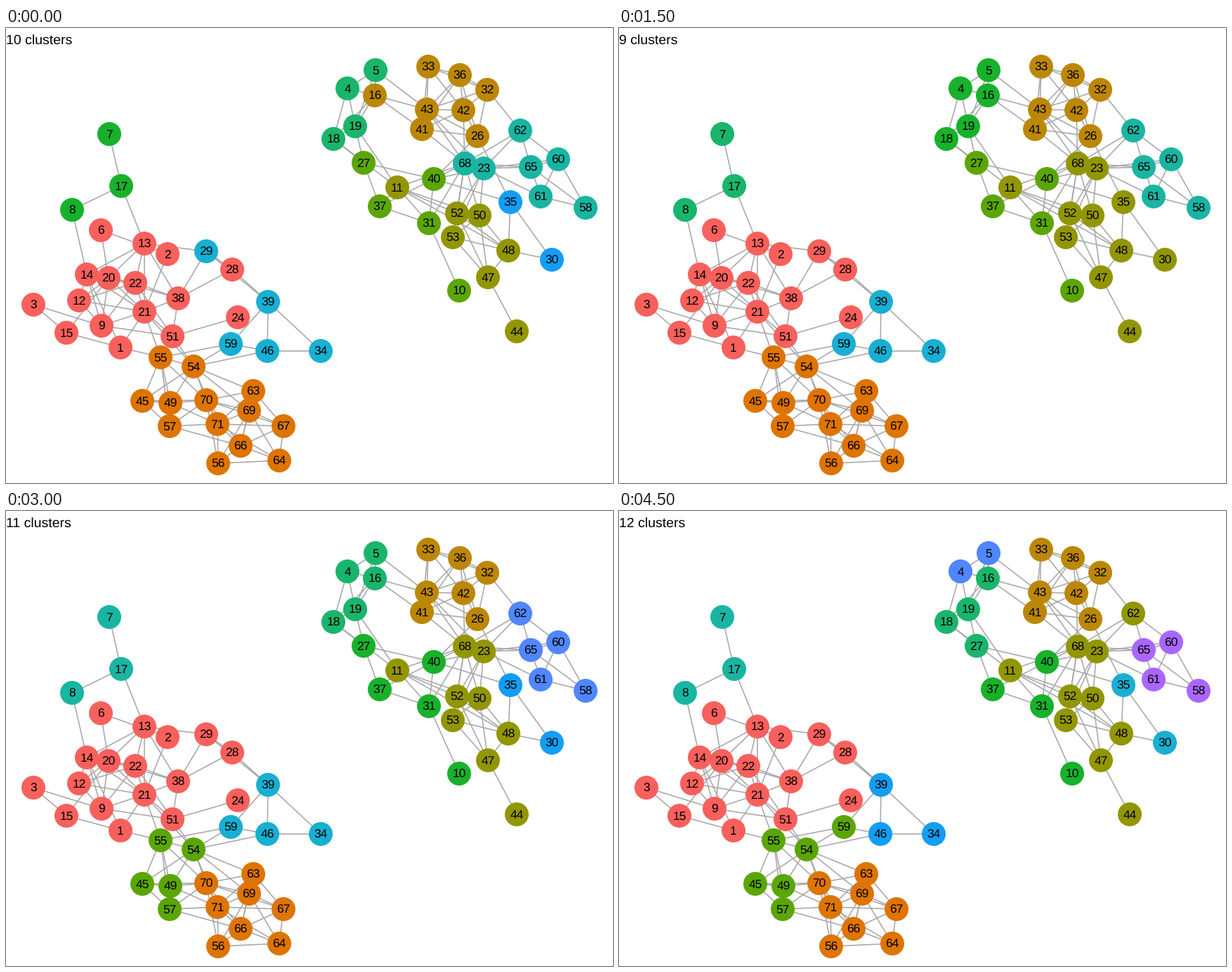
A matplotlib script for the animation above (5 s loop, 864 by 648 pixels).

```python
from itertools import combinations, pairwise, product
from math import dist

import matplotlib.pyplot as plt
from matplotlib.animation import FuncAnimation
from matplotlib.collections import LineCollection

W, H, DPI = 864, 648, 100
PT = 72 / DPI  # points per pixel
RADIUS = 17
REACH = 104    # nodes of linked parts are joined up to this distance

plt.rcParams.update({"font.family": "Liberation Sans", "text.hinting": "none"})

PALETTE = ["#F8605C", "#DE7402", "#BC8706", "#929603", "#5BA607", "#18B12B",
           "#1AB56C", "#19B5A2", "#18AFD2", "#149DF5", "#5086FF", "#A967FF"]

# Parts are sets of nodes that always share a cluster
LEFT = {
    "north": {7: (147, 151), 8: (94, 259), 17: (164, 225)},
    "crown": {2: (230, 322), 6: (135, 288)},
    "core": {9: (136, 424), 12: (104, 388), 13: (197, 307), 14: (115, 351),
             20: (146, 356), 21: (197, 404), 22: (184, 363), 38: (245, 385),
             51: (237, 439)},
    "west": {3: (39, 394), 15: (86, 434)},
    "east": {34: (448, 460), 39: (373, 390), 46: (372, 460)},
    "neck": {54: (267, 482), 55: (220, 469)},
    "nape": {45: (194, 531), 49: (234, 534)},
    "low": {56: (302, 620), 63: (352, 517), 64: (389, 616), 66: (334, 595),
            67: (395, 567), 69: (346, 545), 70: (285, 530), 71: (301, 564)},
    "1": {1: (163, 455)}, "24": {24: (330, 412)}, "28": {28: (322, 344)},
    "29": {29: (285, 318)}, "57": {57: (233, 567)}, "59": {59: (320, 450)},
}
RIGHT = {
    "pair": {4: (486, 86), 5: (526, 60)},
    "side": {18: (466, 158), 19: (497, 140)},
    "top": {26: (671, 154), 32: (685, 88), 33: (601, 55), 36: (646, 67),
            41: (592, 144), 42: (651, 117), 43: (599, 116)},
    "ring": {37: (532, 254), 40: (609, 215)},
    "mid": {11: (557, 227), 47: (686, 355), 48: (715, 317), 50: (674, 267),
            52: (642, 264), 53: (636, 298)},
    "hub": {23: (680, 200), 68: (653, 193)},
    "fan": {58: (825, 256), 60: (786, 187), 61: (761, 240), 65: (747, 198)},
    "duo": {30: (777, 330), 35: (718, 248)},
    "10": {10: (645, 374)}, "16": {16: (525, 96)}, "27": {27: (509, 192)},
    "31": {31: (602, 278)}, "44": {44: (727, 432)}, "62": {62: (732, 146)},
}
PARTS = {**LEFT, **RIGHT}
POS = {n: p for part in PARTS.values() for n, p in part.items()}
NODES = sorted(POS)

# Neighbouring parts, linked wherever their nodes are within reach
JOINS = """core-29 core-28 28-29 28-east east-59 neck-59 west-1 1-neck
    neck-nape neck-low nape-57 nape-low pair-side pair-16 side-16 side-27
    ring-27 ring-31 ring-hub hub-mid hub-fan hub-62""".split()

# Single links between parts, written as walks
WALKS = [
    (8, 14, 1, 21, 55, 51, 54, 21, 2), (17, 13), (6, 20, 15), (3, 9),
    (24, 51), (46, 54), (29, 39), (55, 57, 66), (71, 57, 70, 67),
    (5, 43, 16, 41, 68, 43, 23, 53, 68, 42), (18, 11, 19), (31, 68),
    (37, 11, 31, 10), (11, 48, 35, 40, 26, 35), (48, 30), (11, 50),
    (44, 47), (23, 60, 62, 65), (32, 62),
]

# Clusters in palette order; a step moves parts away from their home
HOME = ["core crown west 1 24 28 29", "low neck nape 57", "top", "mid hub 44"]
STEPS = [
    ["", "", "16", "", "ring 27 31 10", "north", "pair side", "fan 62 hub",
     "east 59 29", "duo"],
    ["", "", "", "", "ring 27 31 10", "north", "pair side 16", "fan 62 hub",
     "east 59", "duo"],
    ["east neck 59", "", "", "", "ring duo 31 10", "pair side 16 27", "north",
     "fan 62 hub"],
    ["", "", "", "duo", "ring 27 31 10", "pair side 16", "north", "fan 62",
     "east 59"],
    ["", "", "", "31 10", "neck nape 57", "pair side ring 16 27", "north",
     "duo", "east 59", "44", "fan 62"],
    ["", "", "pair side 16", "", "neck nape 57 1", "ring 27 31 10", "west",
     "north", "24", "duo", "east 59", "fan 62"],
    ["", "", "", "", "neck nape 57", "ring 27 31 10", "pair side 16", "north",
     "east 59", "duo", "fan 62"],
    ["", "", "16", "duo", "neck nape", "10", "north", "pair side ring 27 31",
     "east 59 28", "fan 62"],
    ["north", "1", "", "duo", "pair side ring 16 27 31 10", "west",
     "fan 62 hub", "east 59 28"],
    ["", "", "", "62", "neck nape 57 59", "ring 31 10", "side 16 27", "north",
     "duo", "east", "pair", "fan"],
]


def find_links():
    pairs = [p for part in PARTS.values() for p in combinations(part, 2)]
    for join in JOINS:
        a, b = join.split("-")
        pairs += product(PARTS[a], PARTS[b])
    near = [(a, b) for a, b in pairs if dist(POS[a], POS[b]) < REACH]
    return near + [p for walk in WALKS for p in pairwise(walk)]


def node_colors(step):
    color = {}
    for clusters in (HOME, step):
        for shade, words in zip(PALETTE, clusters):
            for word in words.split():
                color.update(dict.fromkeys(PARTS[word], shade))
    return [color[n] for n in NODES]


fig = plt.figure(figsize=(W / DPI, H / DPI), dpi=DPI, facecolor="white")
ax = fig.add_axes([0, 0, 1, 1])
ax.set(xlim=(0, W), ylim=(H, 0))
ax.axis("off")

segments = [(POS[a], POS[b]) for a, b in find_links()]
ax.add_collection(LineCollection(segments, colors="#A8A8A8",
                                 linewidths=1.6 * PT, zorder=1))
dots = ax.scatter(*zip(*(POS[n] for n in NODES)), s=(2 * RADIUS * PT) ** 2,
                  linewidths=0, zorder=2)
for n in NODES:
    x, y = POS[n]
    ax.text(x, y + 6.2, str(n), size=17.4 * PT, ha="center", va="baseline",
            zorder=3)
title = ax.text(0, 22.5, "", size=19.5 * PT, va="baseline")


def draw(i):
    dots.set_facecolor(node_colors(STEPS[i]))
    title.set_text(f"{len(STEPS[i])} clusters")
    return dots, title


anim = FuncAnimation(fig, draw, frames=len(STEPS), interval=500,
                     init_func=lambda: draw(0), repeat=True, repeat_delay=0)
plt.show()
```
